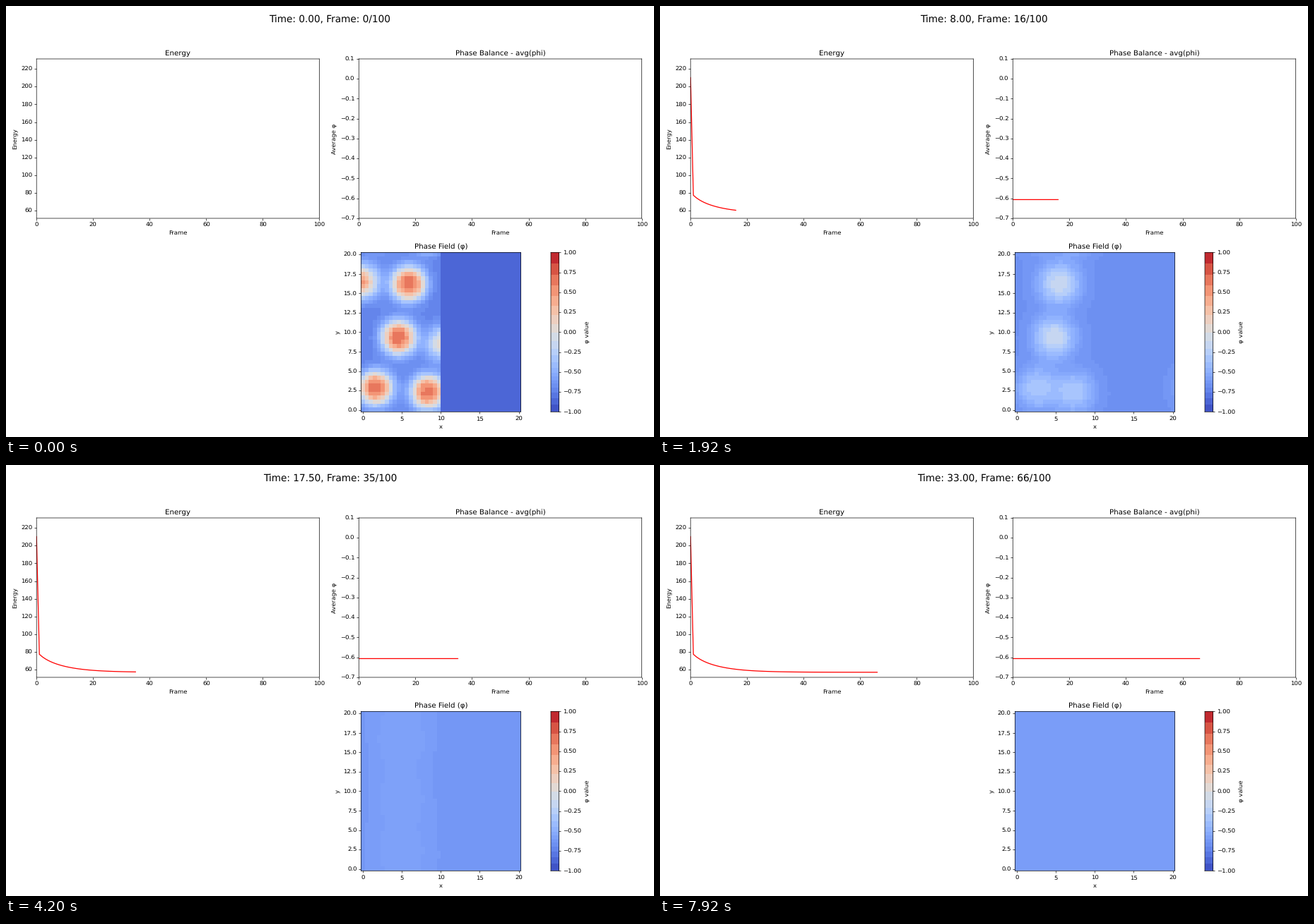
Write a matplotlib script that moves like this. It is 917 by 611 pixels and loops after 8000 ms.

```python
import numpy as np
import matplotlib.pyplot as plt
from matplotlib.animation import FuncAnimation

W, H = 917, 611
DPI = W / 15
plt.rcParams.update({"font.family": "DejaVu Sans", "text.hinting": "none",
                     "path.snap": False})

# Field grid: 40 cells per side, periodic
N = 40
AXIS = np.linspace(0, 20, N)
STEP = AXIS[1]
SPAN = N * STEP
X, Y = np.meshgrid(AXIS, AXIS)

# Colour bands, finest around the mean phase and wider away from it
MEAN = -.608
width = .0085 * np.arange(1, 36, 2) ** 1.5
EDGES = np.concatenate([MEAN - width, MEAN + width])
EDGES = np.sort(np.append(EDGES[np.abs(EDGES) < 1], [-1, 1]))
MIDS = (EDGES[:-1] + EDGES[1:]) / 2

# Droplets: x, y, drift in x per step, strength, lifetime in steps
DROPS = [(5.9, 16.2, -.028, 1.38, 16.5),
         (4.6, 9.3, .01, 1.38, 16.5),
         (1.6, 2.8, .065, 1.38, 13.5),
         (8.4, 2.3, -.065, 1.38, 13.5)]


def snap(v):
    return MIDS[np.clip(np.searchsorted(EDGES, v) - 1, 0, len(MIDS) - 1)]


def wrap(d):
    return (d + SPAN / 2) % SPAN - SPAN / 2


def blob(cx, cy, rx, ry, power=2):
    r = np.hypot(wrap(X - cx) / rx, wrap(Y - cy) / ry)
    return np.exp(-r ** power)


def field(k):
    turn = 2 * np.pi / SPAN
    wave = .05 * np.exp(-k / 5) + .025 * np.exp(-((k - 33) / 10) ** 2)
    f = MEAN + .001 - .14 * np.exp(-k / 16)
    f = f + wave * (np.cos(turn * (X - 4.95)) + np.cos(turn * (Y - 1.6)) / 8)
    f -= .07 * np.exp(-k / 10) * blob(15.2, 12.5, 2.5, 8.2)

    # Droplets soften as they dissolve
    size = 2.15 + .014 * k
    power = 2 + .6 * np.exp(-k / 10)
    for x, y, drift, amp, life in DROPS:
        f += (amp * np.exp(-(k / life) ** 1.8)
              * blob(x + drift * k, y, size, size, power))

    # Droplets cut by the border of the filled half vanish quickly
    quick = np.exp(-k / 1.7)
    f += 1.25 * quick * blob(-.2, 16.5, 2, 2)
    f += .9 * quick * blob(10.4, 8.5, 2, 2)
    if k == 0:
        f[X > 10] = -.87
    return snap(f)


fig = plt.figure(figsize=(W / DPI + 1e-5, H / DPI + 1e-5), dpi=DPI,
                 facecolor="white")


def panel(left, top, right, bottom, title="", xlabel="", ylabel=""):
    ax = fig.add_axes([left / W, 1 - bottom / H,
                       (right - left) / W, (bottom - top) / H])
    ax.set_title(title)
    ax.set_xlabel(xlabel)
    ax.set_ylabel(ylabel)
    return ax


ax_e = panel(43.2, 75, 443.4, 301, "Energy", "Frame", "Energy")
ax_e.set(xlim=(0, 100), ylim=(51.5, 231.3), yticks=range(60, 221, 20))
ax_b = panel(499.3, 75, 899.7, 301, "Phase Balance - avg(phi)",
             "Frame", "Average φ")
ax_b.set(xlim=(0, 100), ylim=(-.7, .1))
ax_f = panel(502.4, 349.5, 728.4, 575.4, "Phase Field (φ)", "x", "y")
cax = panel(771, 349.5, 782.4, 575.4, ylabel="φ value")

look = dict(cmap="coolwarm", vmin=-1, vmax=1, origin="lower",
            interpolation="nearest", aspect="auto")
lo, hi = -STEP / 2, 20 + STEP / 2
image = ax_f.imshow(field(0), extent=(lo, hi, lo, hi), **look)
ax_f.set(xticks=range(0, 21, 5), yticks=np.arange(0, 20.1, 2.5))

ramp = snap(np.linspace(-1, 1, 400))[:, None]
cax.imshow(ramp, extent=(0, 1, -1, 1), **look)
cax.set(xticks=[], yticks=np.arange(-1, 1.01, .25))
cax.yaxis.tick_right()
cax.yaxis.set_label_position("right")

steps = np.arange(67)
energy = (57.2 + 18.3 * np.exp(-.112 * (steps - 1))
          + 2 * np.exp(-.5 * (steps - 1)))
energy[0] = 210.2
balance = np.full(67, -.606)
line_e, = ax_e.plot([], [], "r-")
line_b, = ax_b.plot([], [], "r-")
heading = fig.suptitle("", fontsize=16, y=.9785)


def update(i):
    k = i // 3
    heading.set_text(f"Time: {k * .5:.2f}, Frame: {k}/100")
    line_e.set_data(steps[:k + 1], energy[:k + 1])
    line_b.set_data(steps[:k + 1], balance[:k + 1])
    image.set_data(field(k))
    return heading, line_e, line_b, image


anim = FuncAnimation(fig, update, frames=200, interval=40, repeat=True,
                     repeat_delay=0, blit=False)
plt.show()
```
